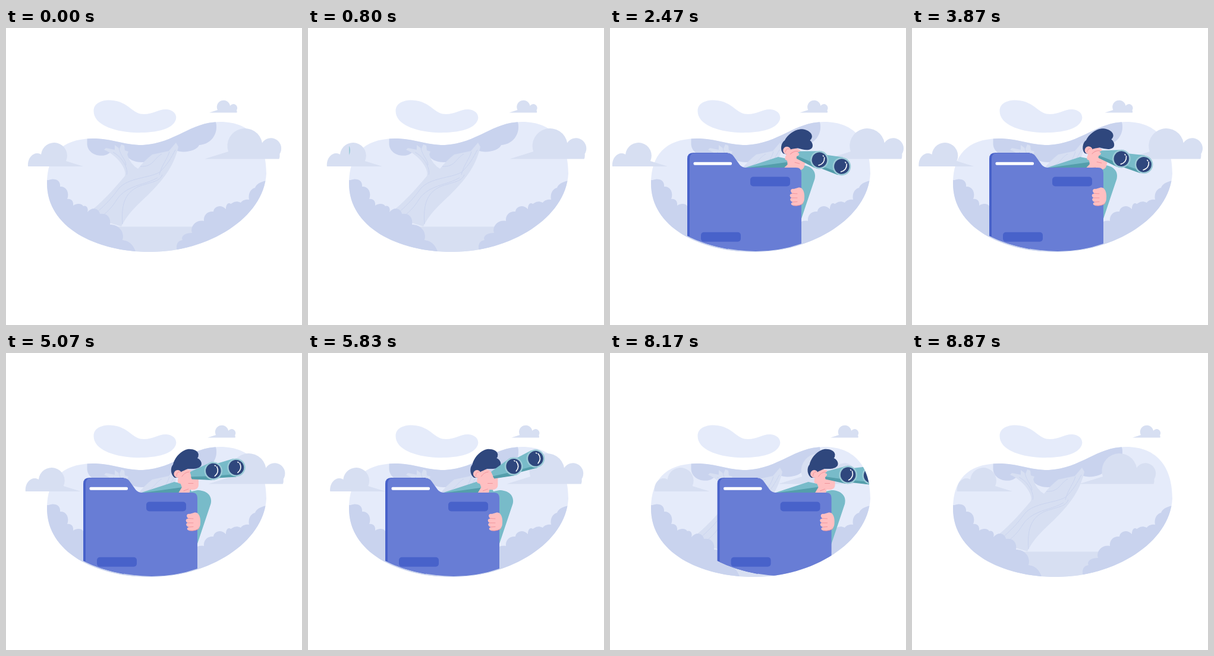
Recreate the animation shown at these times as an HTML page. Size 498 by 500 pixels, loop 9010 ms.

```html
<!DOCTYPE html>
<html lang="en">
<head>
<meta charset="utf-8">
<title>Looking out</title>
<style>
  html, body { margin: 0; width: 100%; height: 100%; overflow: hidden; background: #fff; }
  svg { display: block; width: 100vw; height: 100vh; }
  .pale { fill: #e5ebfa; }
  .mist { fill: #d7dff2; }
  .leaf { fill: #c9d3ee; }
  .bark { fill: none; stroke: #c9d3ee; }
  .blue { fill: #687dd5; }
  .deep { fill: #4862ca; }
  .navy { fill: #2f477d; }
  .teal { fill: #78bbc9; }
  .shade { fill: #549eab; }
  .rim { fill: #9ccbd7; }
  .skin { fill: #ffbfc1; }
  .crease { fill: none; stroke: #f0959c; stroke-linecap: round; }
  .glint { fill: none; stroke: #fff; stroke-width: 1.6; stroke-linecap: round; }
</style>
</head>
<body>
<svg viewBox="0 0 498 500">
  <defs>
    <path id="blob" d="M69 262C69 215 92 187 145 186C180 186 196 197 230 197C285 194 310 158 360 158C415 158 438 195 438 245C434 320 340 377 243 377C150 377 69 335 69 262Z"/>
    <clipPath id="land"><use href="#blob"/></clipPath>
    <clipPath id="window"><use href="#blob"/><path d="M69 262V100H400V200Z"/></clipPath>
    <g id="lens">
      <circle class="rim" r="15.300"/>
      <circle class="navy" r="12.800"/>
      <path class="glint" d="M7-6Q10 4 1 9M4-8.500l1 1"/>
    </g>
  </defs>

  <path class="pale" d="M147.500 140C147 122 172 118 190 124C210 131 215 145 232 145C248 145 258 136 270 137C284 138 290 149 284 158C275 174 240 177 215 176C180 174 147.500 162 147.500 140Z"/>
  <use href="#blob" class="pale"/>

  <g clip-path="url(#land)">
    <path class="mist" d="M170 334.500H330V380H170Z"/>
    <path class="leaf" d="M136.500 180V196C138 213 158 218 170 213C180 206 190 204 200 210C206 225 225 228 238 225C258 222 272 213 285 206C300 212 322 206 325 197C345 196 358 178 353 158V150H136.500Z"/>
    <path class="mist" d="M145 306C165 290 186 266 200 249C204 238 187 214 165 205L168 202L183 205V197L191 203L194 196L199 198L200 206L206 208L204 213Q209 229 222 237Q233 223 246 213L274 207L286 193L290 200C282 235 262 258 238 282C215 303 204 315 194 334L155 322Z"/>
    <path class="bark" d="M196 330C194 300 198 277 225 266C250 258 258 258 263 247M152 311C176 290 182 280 190 270C205 252 240 253 258 243C272 230 278 218 285 205M165 314C190 292 182 286 205 272C224 262 238 262 255 252M180 209C197 218 206 238 203 247M190 202C193 217 201 220 202 231M226 233C248 234 248 220 262 212M258 247C263 228 271 222 275 208"/>
    <path class="leaf" d="M60 256H72C82 252 92 256 91 267C102 266 107 278 103 288C110 287 114 292 113 299C120 294 128 296 130 300C136 298 139 304 137 310C146 299 157 305 158 313C170 311 177 319 175 331C190 331 200 343 196 357C207 358 216 366 219 380H60Z"/>
    <path class="leaf" d="M445 256C431 257 421 262 419 269C411 271 407 280 409 289C402 288 397 291 395 294C385 289 380 296 378 296C373 293 370 298 370 305C362 296 350 300 349 309C337 308 332 317 333 325C320 322 309 334 313 345C298 345 294 353 297 357C286 359 286 367 288 380H445Z"/>
  </g>

  <path id="cloudTop" class="mist" d="M342 142.500L356 138A11.200 11.200 0 1 1 377 131A6.500 6.500 0 0 1 388 138.500Q389 140 388.500 142.500Z"/>
  <path id="cloudLeft" class="mist" d="M37 233C36 215 50 207 59 213A22 22 0 1 1 101 224L130 233Z"/>
  <path id="cloudRight" class="mist" d="M334 220.500L374 208A29.500 29.500 0 1 1 431 193.500A17 17 0 0 1 460.500 212Q461 217 459.500 220.500Z"/>

  <g clip-path="url(#window)">
    <g id="scout">
      <path class="teal" d="M228 235L283 217L307 222L312 233L322 231C336 231 348 239 344.500 254L321 324V240Z"/>
      <path class="shade" d="M232 235L304 225L298 235Z"/>
      <g id="head">
        <path class="skin" d="M291 202L306 194L328 206V222C328 230 320 231 314 230L312 238L303 242L294 236L300 226Z"/>
        <path class="crease" d="M311 219.500h8M303 232L311 229"/>
        <path class="navy" d="M288 210C281 206 280 193 285 188C287 178 296 167 305 163.500C312 160 327 162 328 171Q328 175 326 177C333 180 335 188 331 191C326 196 316 195 310 195C305 197 301 199 299 200L295 210Z"/>
        <circle class="skin" cx="293" cy="203.500" r="6.500"/>
        <path class="crease" d="M291 206.500Q291 200 296 200"/>
        <g id="glasses">
          <path class="teal" d="M349 195L387 190.500V221.500L349 216Z"/>
          <path class="shade" d="M355 214L386 217V221.500L355 218Z"/>
          <use href="#lens" x="389" y="206"/>
          <path class="teal" d="M311 200L350 189.500V220.500L312 212Z"/>
          <path class="shade" d="M311 208L338 212L346 220L312 212.500Z"/>
          <use href="#lens" x="350" y="205"/>
        </g>
        <path class="skin" d="M294 219C290 211 299 199 312 196.500C316 197 315 200 311 202C318 204 313 207 310 211L301 221Z"/>
        <path class="crease" d="M300 208Q304 201 312 200"/>
      </g>
      <path class="deep" d="M130 350V220Q130 210 140 210H198V372Q160 365 130 350Z"/>
      <path class="blue" d="M134 352V220Q134 210.500 143 210.500H198Q204 210.500 208 216L218 230Q222 235 229 235H313Q322 235 322 244V363Q285 376 245 376Q180 374 134 352Z"/>
      <rect x="140.500" y="225.700" width="64.500" height="5" rx="2" fill="#fff"/>
      <rect class="deep" x="236" y="250.500" width="67" height="16" rx="5"/>
      <rect class="deep" x="153" y="343.700" width="67" height="16" rx="5"/>
      <path class="skin" d="M316 269C324 266 328 277 327 286C327 296 321 300 309 299C303 298 304 294 308 293C302 292 302 286 306 286C301 284 302 278 307 279C302 275 304 270 309 271Z"/>
      <path class="crease" d="M307 278.500l8 .5M306 286h9M308 293l7-.5M309 299Q320 300 325 295"/>
    </g>
  </g>
</svg>
<script>
const LOOP = 9010;
const sine = p => (1 - Math.cos(Math.PI * p)) / 2;
const cubic = p => p < .5 ? 4 * p ** 3 : 1 - 4 * (1 - p) ** 3;

// Eased value at time t along [time, value] keys
function track(t, keys, ease = sine) {
  if (t <= keys[0][0]) return keys[0][1];
  for (let i = 1; i < keys.length; i++) {
    const [t0, a] = keys[i - 1], [t1, b] = keys[i];
    if (t < t1) return a + (b - a) * ease((t - t0) / (t1 - t0));
  }
  return keys.at(-1)[1];
}

const place = (id, value) => document.getElementById(id).setAttribute('transform', value);
const slide = (id, x) => place(id, `translate(${x})`);

function draw(now) {
  const t = now % LOOP;
  slide('cloudLeft', track(t, [[100, 0], [2900, -35], [5700, 0], [8500, 39]]));
  slide('cloudRight', track(t, [[50, 0], [2950, 33], [5930, 0], [8500, -53]]));
  slide('cloudTop', track(t, [[100, 0], [2900, -24], [5700, 0], [7830, 29]]));
  slide('scout', track(t, [[555, -350], [1630, 0], [7800, 0], [8880, 312]], cubic));

  // Looking down turns the whole head; looking up leans it back and lifts the binoculars
  const tilt = track(t, [[1430, 0], [2700, 16], [3380, 16], [6110, -22], [6930, -22], [7900, 0]]);
  const down = Math.max(0, tilt), up = Math.min(0, tilt);
  place('head', `translate(${up * .41}) rotate(${down} 285 223)`);
  place('glasses', `rotate(${up} 314 185)`);
  requestAnimationFrame(draw);
}
requestAnimationFrame(draw);
</script>
</body>
</html>
```
